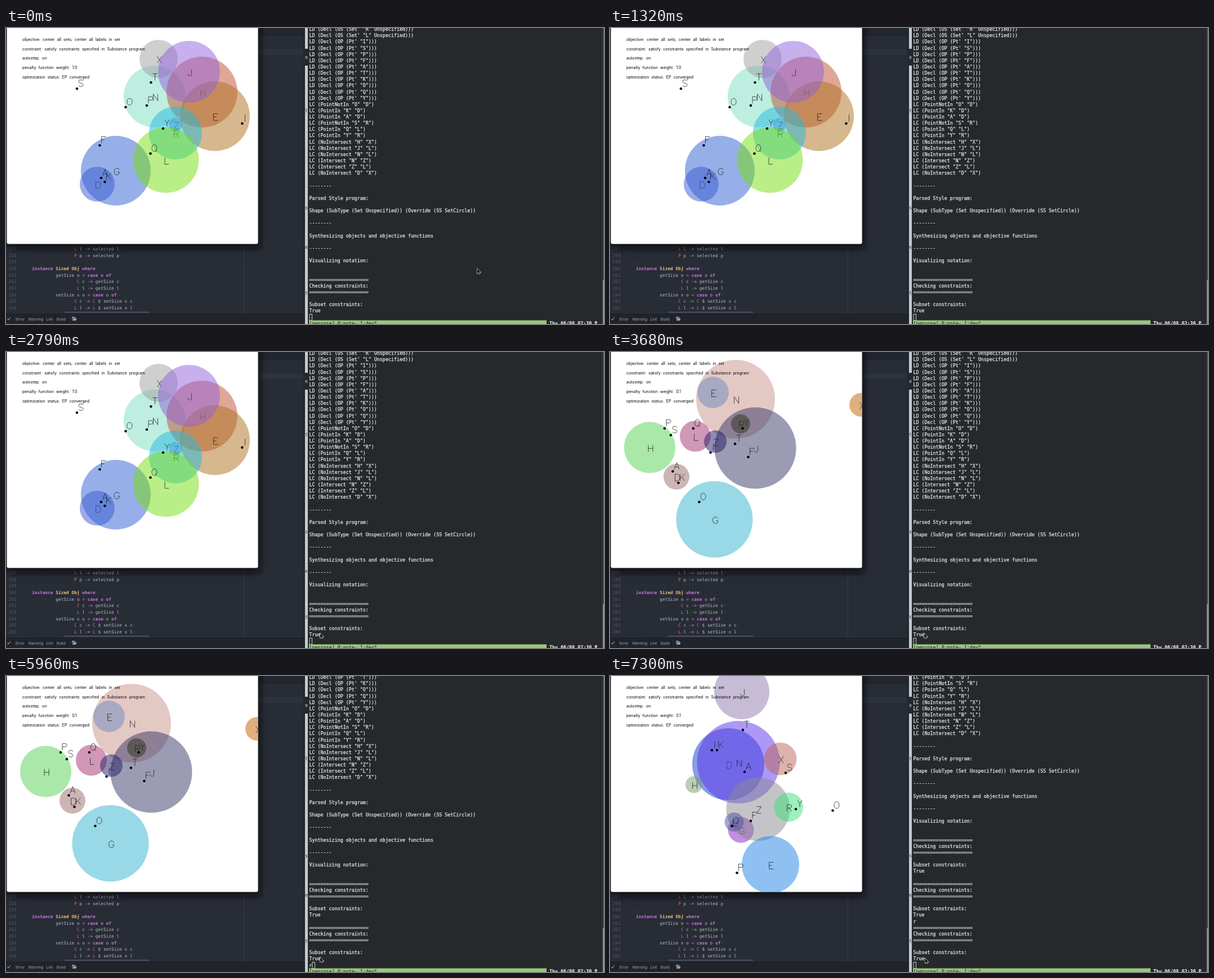
Write an HTML page with a canvas that moves like this. It is 1062 px wide and 527 px high and loops after 8000 ms.

```html
<!DOCTYPE html>
<html lang="en">
<head>
<meta charset="utf-8">
<title>Diagram sampler</title>
<style>
html, body { margin: 0; width: 100%; height: 100%; overflow: hidden; background: #282c34; }
canvas { display: block; }
</style>
</head>
<body>
<canvas id="stage" width="1062" height="527"></canvas>
<script>
const ctx = document.getElementById('stage').getContext('2d');
const LOOP = 8000;
const MONO = '"DejaVu Sans Mono", monospace';
const TERM_FONT = '8.33px ' + MONO;
const LINE = 11.14;

// Single-stroke capitals, centred on the origin
const BOWL = 'M-4 6V-6H1C5 -6 5 0 1 0H-4';
const RING = 'M0 -6C-6 -6 -6 6 0 6S6 -6 0 -6';
const GLYPHS = {
  A: 'M-4.5 6L0 -6L4.5 6M-3 2H3',
  D: 'M-4 -6V6H0C6 6 6 -6 0 -6Z',
  E: 'M4 -6H-4V6H4M-4 -.3H1',
  F: 'M4 -6H-4V6M-4 -.3H1',
  G: 'M4.5 -3C3 -7 -4.5 -7.5 -4.5 0S3 7 4.5 3V1H1',
  H: 'M-4 -6V6M4 -6V6M-4 0H4',
  I: 'M-2 -6V6',
  J: 'M3 -6V3C3 7 -3.5 7 -3.5 2',
  K: 'M-4 -6V6M4 -6L-4 2M-1 -1L4 6',
  L: 'M-3.5 -6V6H3.5',
  N: 'M-4 6V-6L4 6V-6',
  O: RING,
  P: BOWL,
  Q: RING + 'M1 3L4.5 7',
  R: BOWL + 'M0 0L4 6',
  S: 'M4 -4C2 -7 -4 -6.5 -4 -3C-4 1 4 -1 4 3C4 6.5 -2 7 -4 4',
  T: 'M-4 -6H4M0 -6V6',
  X: 'M-4 -6L4 6M4 -6L-4 6',
  Y: 'M-4 -6L0 0V6M4 -6L0 0',
  Z: 'M-4 -6H4L-4 6H4'
};
const strokes = {};
for (const k in GLYPHS) strokes[k] = new Path2D(GLYPHS[k]);

// Sets: name, x, y, radius, colour (half transparent). Points: name, x, y.
const SCENES = [
  {
    from: 0, weight: '1.0',
    sets: [
      ['N', 264, 122, 55, '#7fddc1'], ['X', 271, 55, 34, '#9f9fa1'],
      ['Z', 301, 172, 12, '#4a7cc6'], ['H', 348, 114, 63, '#c15131'],
      ['E', 371, 157, 62, '#ad711f'], ['J', 325, 78, 55, '#9161dd'],
      ['R', 301, 187, 47, '#25bbdd'], ['D', 162, 278, 31, '#3f57d1'],
      ['G', 195, 254, 62, '#3161d1'], ['L', 284, 235, 58.5, '#77dd11']
    ],
    points: [
      ['S', 126, 108], ['T', 257.5, 97], ['O', 212.5, 141], ['P', 250, 138], ['I', 419.5, 170],
      ['Y', 279, 179], ['Q', 256.5, 223.5], ['F', 166.5, 209], ['A', 169, 267], ['K', 175.5, 274]
    ]
  },
  {
    from: 3680, weight: '0.1',
    sets: [
      ['N', 223, 84, 70, '#c99189'], ['E', 183, 72, 28, '#6c8cc2'],
      ['X', 446, 94, 21, '#c16101'], ['H', 70.5, 170, 45.5, '#57d157'],
      ['J', 258, 171, 72.5, '#393969'], ['L', 151.5, 150, 27.5, '#a13171'],
      ['Z', 187, 159.5, 20, '#221a66'], ['R', 232, 128, 17, '#2c341a'],
      ['D', 118, 222, 23, '#996d69'], ['G', 185.5, 298, 68, '#35b1cd']
    ],
    points: [
      ['P', 97, 136], ['S', 108, 148], ['Q', 148, 136], ['Y', 235.5, 136], ['T', 222, 163.5],
      ['F', 245.5, 187], ['I', 178.5, 179], ['A', 111.5, 212.5], ['K', 121.5, 233], ['O', 158.5, 267]
    ]
  },
  {
    from: 7300, weight: '0.1',
    sets: [
      ['J', 234, 28, 49, '#8d7bad'], ['D', 210, 157, 64, '#113fcd'],
      ['N', 228, 153.5, 73.5, '#5f33eb'], ['X', 302.5, 147.5, 29, '#b96959'],
      ['H', 149, 193.5, 15, '#759b71'], ['G', 232.5, 274, 23, '#8521c1'],
      ['Z', 263, 237, 56.5, '#898991'], ['L', 220.5, 260, 17, '#4955a1'],
      ['R', 317, 233.5, 26, '#3de179'], ['E', 285, 336, 51, '#1f83e5']
    ],
    points: [
      ['T', 236, 96], ['I', 181, 132], ['K', 190, 132], ['A', 239, 170.5], ['S', 312, 172.5],
      ['Y', 330, 237], ['O', 395.5, 239.5], ['F', 250, 258], ['Q', 216.5, 267], ['P', 225.5, 350.5]
    ]
  }
];

// Terminal log
const rule = '--------';
const bar = '='.repeat(21);
const check = [bar, 'Checking constraints:', bar, '', 'Subset constraints:', 'True'];
const LOG = [
  ...[...'RL'].map(s => `LD (Decl (OS (Set' "${s}" Unspecified)))`),
  ...[...'ISPFATKOQY'].map(p => `LD (Decl (OP (Pt' "${p}")))`),
  ...('PointNotIn O D,PointIn K D,PointIn A D,PointNotIn S R,PointIn Q L,PointIn Y R,' +
    'NoIntersect H X,NoIntersect J L,NoIntersect N L,Intersect N Z,Intersect Z L,NoIntersect D X')
    .split(',').map(s => s.replace(/(\w+) (\w) (\w)/, 'LC ($1 "$2" "$3")')),
  '', rule, '', 'Parsed Style program:', '',
  'Shape (SubType (Set Unspecified)) (Override (SS SetCircle))', '',
  rule, '', 'Synthesizing objects and objective functions', '',
  rule, '', 'Visualizing notation:', '', '',
  ...check, '', ...check, 'r', ...check
];
const ROWS = 46;

const CODE = [
  [16, 'L l -> selected l'], [16, 'P p -> selected p'], [0, ''],
  [0, 'instance Sized Obj where'], [9, 'getSize o = case o of'],
  [17, 'C c -> getSize c'], [17, 'L l -> getSize l'],
  [9, 'setSize x o = case o of'],
  [16, 'C c -> C $ setSize x c'], [16, 'L l -> L $ setSize x l']
];

// Pointer stops: time, x, y (y past the bottom edge hides it)
const POINTER = [
  [0, 837.5, 429], [600, 713, 399], [870, 722, 440], [1020, 690, 490], [1170, 600, 516],
  [1320, 540, 540], [1470, 470, 518], [1620, 500, 521], [1750, 540, 522], [1900, 570, 540],
  [2050, 600, 519], [2200, 645, 440], [2350, 640, 373], [2500, 610, 420], [2650, 575, 470],
  [2790, 558.5, 501], [6410, 559, 502], [6850, 560, 503]
];

const latest = (list, t, time) => list.filter(e => time(e) <= t).pop();

function rect(x, y, w, h, color) {
  ctx.fillStyle = color;
  ctx.fillRect(x, y, w, h);
}

function text(s, x, y, color, font) {
  ctx.font = font;
  ctx.fillStyle = color;
  ctx.fillText(s, x, y);
}

// Terminal type is slightly heavier than the regular cut
function termText(s, x, y) {
  text(s, x, y, '#e6eae8', TERM_FONT);
  ctx.strokeStyle = '#e6eae8';
  ctx.lineWidth = 0.25;
  ctx.strokeText(s, x, y);
}

function disc(x, y, r, color) {
  ctx.fillStyle = color;
  ctx.beginPath();
  ctx.arc(x, y, r, 0, Math.PI * 2);
  ctx.fill();
}

function label(name, x, y) {
  ctx.save();
  ctx.translate(x, y);
  ctx.strokeStyle = '#222';
  ctx.lineWidth = 0.8;
  ctx.stroke(strokes[name]);
  ctx.restore();
}

function codeLine(s, x, y) {
  const cell = 4.7;
  for (const m of s.matchAll(/\S+/g)) {
    const w = m[0];
    const color = /^(instance|where|case|of|=)$/.test(w) ? '#c678dd'
      : /^(Sized|Obj)$/.test(w) ? '#e5c07b'
      : /^[CLP]$/.test(w) ? '#e06c75' : '#b4bac5';
    const weight = /^(instance|where|case|of|Sized|Obj)$/.test(w) ? 'bold ' : '';
    text(w, x + m.index * cell, y, color, weight + '7.8px ' + MONO);
  }
  text('¬', x + s.length * cell, y, '#414752', '7.8px ' + MONO);
}

function drawEditor() {
  rect(0, 0, 531, 527, '#282c35');
  rect(0, 0, 531, 13, '#22262e');
  rect(0, 13, 531, 1, '#1d2027');
  rect(448, 38, 79, 10, '#2c323e');
  rect(527, 14, 4, 496, '#252932');
  rect(422, 385, 1, 124, '#373c47');
  CODE.forEach(([indent, s], i) => {
    const y = 395.8 + i * 11.7;
    text(String(257 + i), 4.5, y, '#535a68', '7.8px ' + MONO);
    text('·'.repeat(indent), 46, y, '#353a44', '7.8px ' + MONO);
    codeLine(s, 46 + indent * 4.7, y);
  });
  rect(104, 505, 150, 2, '#4a505d');

  rect(0, 509, 531, 18, '#21252b');
  rect(0, 509, 531, 1, '#191c21');
  ctx.strokeStyle = '#c3c8d0';
  ctx.lineWidth = 1;
  ctx.stroke(new Path2D('M2.5 518L4.2 520L7.5 515.5'));
  [['Error', 17], ['Warning', 39.5], ['Lint', 71.5], ['Build', 90]].forEach(([s, x]) => {
    text(s, x, 521, '#9da5b4', '6.8px Inter, sans-serif');
  });
  [13, 35.5, 68, 86.5, 108.5].forEach(x => rect(x, 511, 1, 16, '#1a1d22'));
  ctx.fillStyle = '#9da5b4';
  ctx.fill(new Path2D('M117.5 514H120.5L121.5 515H124V516.3H119L117.5 520Z'));
  ctx.fill(new Path2D('M119.6 517H125.5L124 521H118Z'));
}

function panel(right, bottom, radius, color) {
  ctx.fillStyle = color;
  ctx.beginPath();
  ctx.roundRect(1.5, -20, right - 1.5, bottom + 20, radius);
  ctx.fill();
}

function drawDiagram(scene) {
  ctx.save();
  panel(457, 398, 10, 'rgba(0,0,0,.15)');
  ctx.shadowColor = 'rgba(0,0,0,.6)';
  ctx.shadowBlur = 16;
  ctx.shadowOffsetY = 5;
  panel(447.6, 384.6, 3, '#fff');
  ctx.shadowColor = 'transparent';
  ctx.clip();

  for (const [name, x, y, r, color] of scene.sets) {
    ctx.globalAlpha = 0.5;
    disc(x, y, r, color);
    ctx.globalAlpha = 1;
    label(name, x + 1.6, y + 1.6);
  }
  for (const [name, x, y] of scene.points) {
    disc(x, y, 2.3, '#000');
    label(name, x + 7, y - 9.7);
  }
  ctx.wordSpacing = '2.2px';
  [
    'objective: center all sets; center all labels in set',
    'constraint: satisfy constraints specified in Substance program',
    'autostep: on',
    'penalty function weight: ' + scene.weight,
    'optimization status: EP converged'
  ].forEach((s, i) => text(s, 29, 22.8 + i * 16.75, '#000', '7px Inter, sans-serif'));
  ctx.restore();
}

function drawTerminal(t) {
  rect(531, 0, 5, 527, '#c2cbce');
  rect(531, 37, 5, 30, '#24282d');
  text('e', 531, 55, '#c8cdd0', TERM_FONT);
  [['t', 150], ['s', 323], ['e', 393], ['t', 475]].forEach(([s, y]) => {
    text(s, 531, y, '#343a40', TERM_FONT);
  });
  rect(536, 0, 526, 527, '#26292c');
  rect(1058, 0, 4, 527, '#303336');
  rect(1061, 0, 1, 527, '#6c7073');
  rect(1060, 449, 2, 78, '#8e9294');

  const first = t < 3830 ? 0 : t < 7300 ? 7 : 14;
  for (let i = 0; i < ROWS; i++) {
    termText(LOG[first + i], 538.5, 5.1 + i * LINE);
  }
  const typed = t >= 5330 && t < 7300 ? 'r' : '';
  termText(typed, 538.5, 517.5);
  ctx.strokeStyle = '#c5cac8';
  ctx.lineWidth = 1;
  ctx.strokeRect(539 + typed.length * 5, 509.5, 4.5, 11);

  rect(538, 520.5, 422, 7, '#97c878');
  text('[penrose] 0:note- 1:dev*', 538.5, 528.6, '#17200f', TERM_FONT);
  text('Thu 06/08 02:30 P', 965, 528.6, '#fff', 'bold ' + TERM_FONT);
}

function drawPointer(t) {
  const [, x, y] = latest(POINTER, t, p => p[0]);
  ctx.save();
  if (t >= 4580 && t < 4730) {
    ctx.strokeStyle = '#b9bdbd';
    ctx.lineWidth = 0.9;
    ctx.stroke(new Path2D('M558 499.5Q560 499.5 560 501V506Q560 507.5 558 507.5M562 499.5Q560 499.5 560 501M560 506Q560 507.5 562 507.5'));
  } else {
    ctx.translate(x - 0.5, y);
    const arrow = new Path2D('M0 0V8L1.9 6.3L3.1 9L4.5 8.4L3.3 5.8H5.8Z');
    ctx.lineWidth = 1.2;
    ctx.strokeStyle = '#e8eaea';
    ctx.stroke(arrow);
    ctx.fillStyle = '#0a0a0a';
    ctx.fill(arrow);
  }
  ctx.restore();
}

function frame(now) {
  const t = now % LOOP;
  drawEditor();
  drawDiagram(latest(SCENES, t, s => s.from));
  drawTerminal(t);
  drawPointer(t);
  requestAnimationFrame(frame);
}
frame(0);
</script>
</body>
</html>
```
